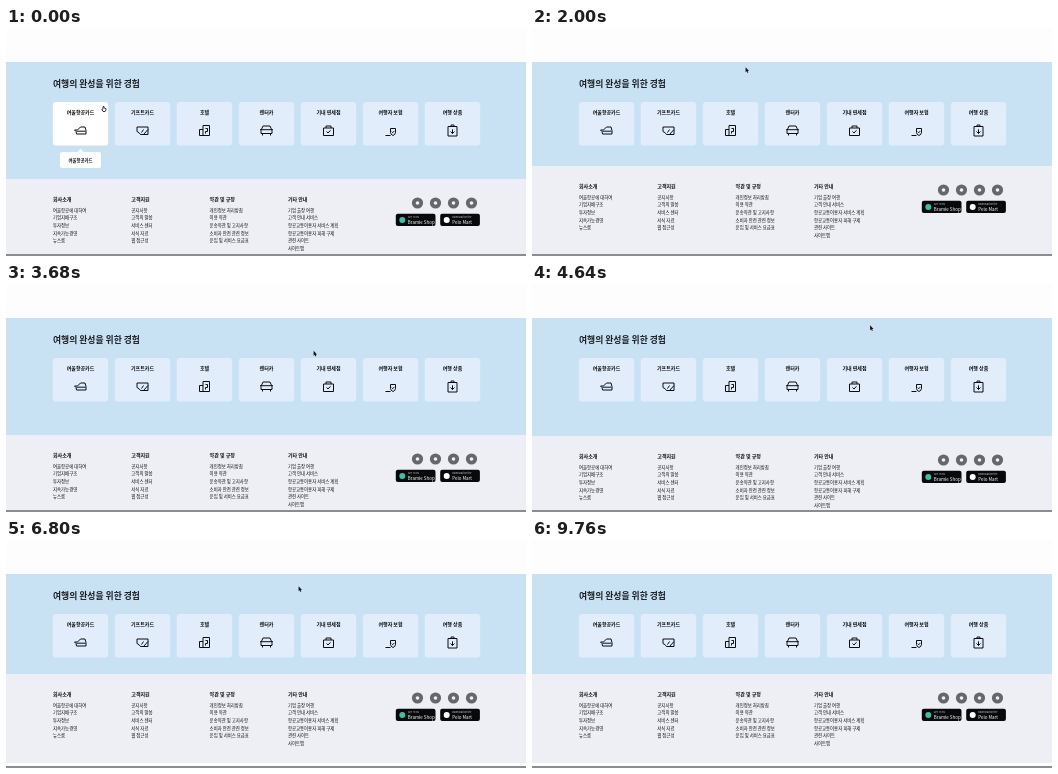
Write an HTML page with a canvas that moves like this. It is 520 px wide and 228 px high and loops after 9840 ms.

```html
<!DOCTYPE html>
<html lang="ko">
<head>
<meta charset="utf-8">
<style>
html, body { margin: 0; width: 520px; height: 228px; overflow: hidden; background: #fdfdfd; }
canvas { display: block; }
</style>
</head>
<body>
<canvas id="stage" width="520" height="228"></canvas>
<script>
const ctx = document.getElementById('stage').getContext('2d');
const LOOP = 9840, STEP = 80, SLIDE = 300, CLOSE_DELAY = 180;
const FONT = '"Noto Sans CJK KR", "Noto Sans CJK", sans-serif';
const INK = '#0c0d10';

// Icons are drawn around their own centre
const cards = [
  ['여울항공카드', 'M-6-.5H-3L0-3.5H4.5L5.5 0V3.5H-4L-4.5 1ZM-4 .7H5'],
  ['기프트카드', 'M-2 4H5.5V-3.5H-5.5V1Q-3 2-2 4M1 4L5.5-1M-1 2L1-1'],
  ['호텔', 'M-1.5-5H5V5H-1.5ZM-1.5-1H-5V5H-1.5M1-2H3V1H1V3'],
  ['렌터카', 'M-5.5 3V0L-3.5-4.5H3.5L5.5 0V3ZM-6.5-.8H6.5M-4 3V5M4 3V5'],
  ['기내 면세점', 'M-5-2.5H5V5H-5ZM-2.5-2.5V-4.5H2.5V-2.5M-2 1L-.5 2.5L2-.2'],
  ['여행자 보험', 'M0-2H5V2Q5 4 2.5 5Q0 4 0 2ZM-5 5H0M1.2 1.2L2.3 2.2L3.8 .5'],
  ['여행 상품', 'M-4.5-4H4.5V5.5H-4.5ZM-1.5-4V-5.5H1.5V-4M0-1.2V3M-2 1L0 3L2 1'],
].map(([label, d], i) => ({ label, icon: new Path2D(d), x: 47 + 62 * i }));

const columns = [
  ['회사소개', '여울항공에 대하여', '기업지배구조', '투자정보', '지속가능경영', '뉴스룸'],
  ['고객지원', '공지사항', '고객의 말씀', '서비스 센터', '서식 자료', '웹 접근성'],
  ['약관 및 규정', '개인정보 처리방침', '이용 약관', '운송약관 및 고지사항', '소비자 안전 관련 정보', '운임 및 서비스 요금표'],
  ['기타 안내', '기업 출장 여행', '고객 안내 서비스', '항공교통이용자 서비스 계획', '항공교통이용자 피해 구제', '관련 사이트', '사이트맵'],
];

// Each hover: where the pointer rests on the card, and where it goes afterwards
const visits = [
  { card: 0, enter: -210, leave: 460, spot: [98, 81], away: [164, 67] },
  { card: 1, enter: 1430, leave: 1680, spot: [158, 82], away: [215, 42] },
  { card: 3, enter: 2822, leave: 3480, spot: [283.5, 78], away: [291, 53] },
  { card: 4, enter: 3700, leave: 4540, spot: [325, 84], away: [339.5, 44] },
  { card: 3, enter: 5440, leave: 6300, spot: [272, 84], away: [294, 49] },
  { card: 3, enter: 7050, leave: 8180, spot: [281, 87], away: [306, 38] },
];

// The pointer arrives at each stop, waits, then glides to the next
const stops = visits.flatMap(({ enter, leave, spot, away }, i) => [
  { at: spot, from: enter + 100, to: leave - 80 },
  { at: away, from: leave + 60, to: (visits[i + 1]?.enter ?? 9100) - 150 },
]).concat({ at: [312, -12], from: 9400, to: LOOP });

const slides = visits.flatMap(v => [
  { start: v.enter, open: 1 },
  { start: v.leave + CLOSE_DELAY, open: 0 },
]);

const clamp = v => Math.min(1, Math.max(0, v));
const mix = (a, b, k) => a + (b - a) * k;

// cubic-bezier(.25, .1, .25, 1)
function ease(x) {
  let lo = 0, hi = 1, s = .5;
  for (let i = 0; i < 18; i++) {
    s = (lo + hi) / 2;
    if (.75 * s * (1 - s) + s ** 3 < x) lo = s; else hi = s;
  }
  return .3 * s * (1 - s) ** 2 + 3 * s * s * (1 - s) + s ** 3;
}

function openness(t) {
  let value = 0;
  slides.forEach(({ start, open }, i) => {
    if (start > t) return;
    const end = Math.min(t, slides[i + 1]?.start ?? t);
    value = mix(value, open, ease(clamp((end - start) / SLIDE)));
  });
  return value;
}

function pointerAt(t) {
  const i = stops.findLastIndex(s => s.from <= t);
  const here = stops[i], next = stops[i + 1];
  if (!next) return here.at;
  const u = clamp((t - here.to) / (next.from - here.to)), k = u * u * (3 - 2 * u);
  return here.at.map((v, axis) => mix(v, next.at[axis], k));
}

function rect(x, y, w, h, color, r = 0) {
  ctx.fillStyle = color;
  ctx.beginPath();
  ctx.roundRect(x, y, w, h, r);
  ctx.fill();
}

function dot(x, y, r, color) {
  rect(x - r, y - r, 2 * r, 2 * r, color, r);
}

function text(str, x, y, size, weight = 400, color = INK, align = 'left') {
  ctx.font = `${weight} ${size}px ${FONT}`;
  ctx.fillStyle = color;
  ctx.textAlign = align;
  ctx.fillText(str, x, y + size * .36);
}

function drawCard({ label, icon, x }, active) {
  const cx = x + 27.5;
  rect(x - .2, 74, 55.4, 43.5, active ? '#fff' : '#e1edfa', 3);
  text(label, cx, 84.5, 5, 700, INK, 'center');
  ctx.save();
  ctx.translate(cx, 102.5);
  ctx.strokeStyle = INK;
  ctx.stroke(icon);
  ctx.restore();
  if (!active) return;
  rect(cx - 20.5, 124, 41, 16, '#fff', 2);
  ctx.fill(new Path2D(`M${cx - 3} 124.3l3-3.5l3 3.5z`));
  text(label, cx, 132, 4.4, 700, INK, 'center');
}

function drawBadge(x, y, color, small, name) {
  rect(x, y, 39.7, 12.3, '#08090b', 2);
  dot(x + 6.5, y + 6.2, 3, color);
  text(small, x + 12, y + 3.5, 2.4, 400, '#ddd');
  text(name, x + 12, y + 8.2, 4.5, 400, '#fff');
}

function drawFooter(top) {
  rect(0, top, 520, 89, '#eeeff4');
  columns.forEach(([title, ...items], i) => {
    const x = 47 + 78.3 * i;
    text(title, x, top + 19.7, 5, 700);
    items.forEach((item, row) => text(item, x, top + 31 + 7.65 * row, 4.4));
  });
  for (let i = 0; i < 4; i++) {
    dot(411.5 + 18 * i, top + 24, 5.6, '#66676b');
    dot(411.5 + 18 * i, top + 24, 1.8, '#f2f2f4');
  }
  drawBadge(389.8, top + 34.7, '#35c3a0', 'GET IT ON', 'Bramle Shop');
  drawBadge(434.2, top + 34.7, '#fff', 'Download on the', 'Pelo Mart');
}

const arrow = new Path2D('M-1.4-2.8V2.2L-.3 1.3L.5 3L1.3 2.6L.6 1H2Z');
const hand = new Path2D('M-1-2.5H0V-1L2-.5V1L1.2 2.5H-1L-2.2 .3L-1 0Z');

function drawPointer([x, y], overCard) {
  ctx.save();
  ctx.translate(x, y);
  ctx.lineWidth = .8;
  ctx.fillStyle = overCard ? '#fff' : '#111';
  ctx.strokeStyle = '#111';
  ctx.fill(overCard ? hand : arrow);
  if (overCard) ctx.stroke(hand);
  ctx.restore();
}

function draw(t) {
  const top = Math.round(134 + 18 * openness(t));
  const hovered = visits.find(v => v.enter <= t && t < v.leave)?.card ?? -1;
  rect(0, 0, 520, 228, '#fdfdfd');
  rect(0, 34, 520, top - 34, '#c8e1f3');
  text('여행의 완성을 위한 경험', 47, 56, 8.8, 700, '#1c1f24');
  cards.forEach((card, i) => drawCard(card, i === hovered));
  drawFooter(top);
  rect(0, 226, 520, 2, '#8b8c90');
  drawPointer(pointerAt(t), hovered >= 0);
}

function tick() {
  const t = performance.now() % LOOP;
  draw(Math.floor(t / STEP) * STEP);
  requestAnimationFrame(tick);
}
tick();
</script>
</body>
</html>
```
